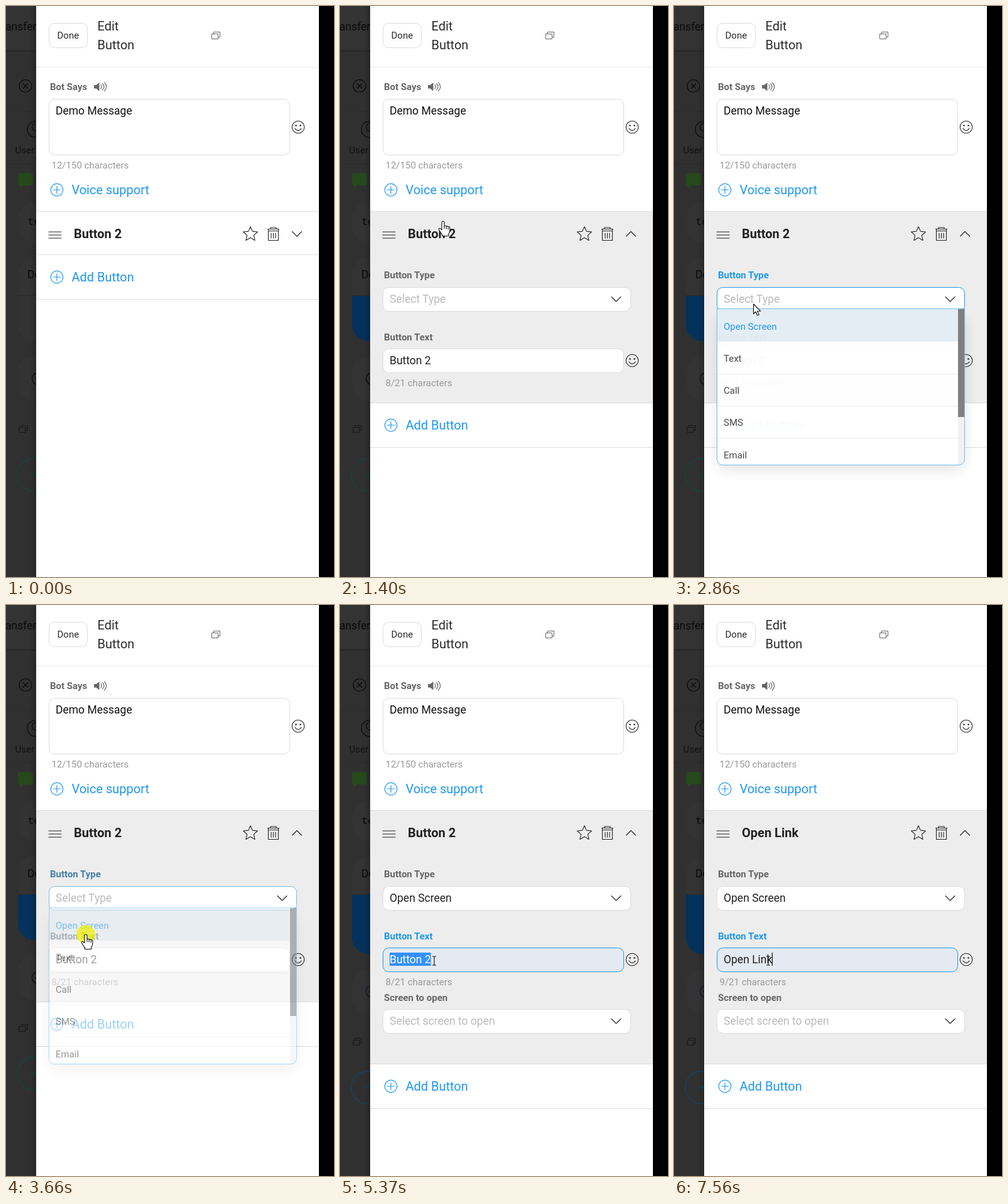
An HTML page for the animation above (8000 ms loop, 522 px wide and 910 px high).

```html
<!DOCTYPE html>
<html lang="en">
<head>
<meta charset="utf-8">
<title>Edit button panel</title>
<style>
  html, body { margin: 0; width: 100%; height: 100%; overflow: hidden; background: #000; }
  svg { display: block; width: 522px; height: 910px; font-family: Roboto, Arial, sans-serif; }
  text { white-space: pre; }
  .ink { fill: none; stroke: #262626; stroke-width: 1.1; stroke-linejoin: round; stroke-linecap: round; }
  .thin { fill: none; stroke: #555; stroke-width: .9; }
  .grey { fill: none; stroke: #666; stroke-width: 1.2; stroke-linecap: round; }
  .blue { fill: none; stroke: #1e98f0; stroke-width: 1.2; stroke-linecap: round; }
  .rule { stroke: #dcdcdc; }
  .dark { fill: none; stroke: #0b0b0b; stroke-width: 1.2; }
  .cursor { fill: #fff; stroke: #111; stroke-width: 1.1; stroke-linejoin: round; }
</style>
</head>
<body>
<svg id="stage" viewBox="0 0 522 910"></svg>
<script>
const LOOP = 8000, TICK = 1000 / 13;
const BLUE = '#1e98f0';

// ---------- markup helpers ----------
const text = (x, y, size, str, fill, extra = '') =>
  `<text x="${x}" y="${y}" font-size="${size}" fill="${fill}" ${extra}>${str}</text>`;
const label = (y, str, id = '') => text(70, y, 15, str, '#666', `font-weight="700" id="${id}"`);
const box = (x, y, w, h, extra = '') =>
  `<rect x="${x + .5}" y="${y + .5}" width="${w - 1}" height="${h - 1}" rx="9" fill="#fff" stroke="#dcdcdc" ${extra}/>`;
const path = (d, cls = 'ink', extra = '') => `<path d="${d}" class="${cls}" ${extra}/>`;
const ring = (x, y, r, cls, extra = '') => `<circle cx="${x}" cy="${y}" r="${r}" class="${cls}" ${extra}/>`;
const rule = y => path(`M48 ${y + .5}H498`, 'rule');
const chevron = (x, y, extra = '') => path(`M${x - 7.5} ${y - 3.5}l7.5 7.5l7.5 -7.5`, 'ink', extra);
const copyIcon = (x, y, cls) => path(`M${x} ${y + 3.5}h10v8h-10zM${x + 3} ${y + 3.5}v-3h10v8h-3`, cls);
const plus = (y, str, id = '') => ring(81, y, 9.8, 'blue') + path(`M75.5 ${y}h11M81 ${y - 5.5}v11`, 'blue') +
  text(104.4, y + 7, 20, str, BLUE, `id="${id}"`);
const smile = y => ring(465, y, 9.8, 'ink') + path(`M460 ${y + 2}q5 7 10 0`) +
  [-3.5, 3.5].map(dx => `<circle cx="${465 + dx}" cy="${y - 2.5}" r="1.3" fill="#262626"/>`).join('');

function star(cx, cy, r) {
  let d = '';
  for (let i = 0; i < 10; i++) {
    const a = -Math.PI / 2 + i * Math.PI / 5, k = i % 2 ? r * .47 : r;
    d += (i ? 'L' : 'M') + (cx + k * Math.cos(a)) + ' ' + (cy + k * Math.sin(a));
  }
  return path(d + 'Z');
}

// ---------- scene ----------
const card = (y, h, extra = '') => `<rect x="19" y="${y}" width="90" height="${h}" rx="26" fill="#333" ${extra}/>`;

const backdrop = `
  <rect width="48" height="910" fill="#303030"/>
  <rect width="48" height="70" fill="#333"/>
  <rect y="70" width="48" height="3" fill="#2a2a2a"/>
  <path d="M0 168.5H48M0 251.5H48" stroke="#2b2b2b"/>
  ${text(-1, 39, 17.5, 'ansfer', '#0b0b0b')}
  ${ring(31, 127.5, 10, 'dark')}${path('M27 123.5l8 8m0 -8l-8 8', 'dark')}
  ${ring(47, 196.5, 13, 'dark')}${ring(48, 193, 6.5, 'dark')}
  ${text(14.5, 235, 15, 'User', '#111')}
  <path d="M19 268q0 -1.5 2 -1.5h20q2 0 2 1.5v16q0 2 -2 2h-14l-5 5v-5h-1q-2 0 -2 -2z" fill="#26491b"/>
  ${card(313, 63)}
  ${text(34, 349, 17, 'te', '#0b0b0b', 'style="font-family:\'Noto Sans Mono\',monospace"')}
  ${card(401, 133, 'id="card"')}
  ${text(34, 434, 17.5, 'Demo', '#0b0b0b')}
  <path d="M19 461.5H48" stroke="#2a2a2a"/>
  <path id="cardFill" fill="#04325c"/>
  <g id="below">
    ${card(558, 71)}
    ${ring(51, 594, 9.5, 'dark', 'id="dot"')}${path('M46 594h5', 'dark')}
    <g opacity=".6">${copyIcon(21, 668, 'dark')}</g>
    <g id="adder" fill="none" stroke-width="1.4"><circle cx="44" cy="747" r="26"/><path d="M40 747h9M44.5 742.5v9"/></g>
  </g>
  <rect x="38" width="10" height="910" fill="url(#edge)"/>`;

const header = `
  ${box(68, 27, 62, 40)}${text(81.5, 52, 15, 'Done', '#2a2a2a')}
  ${text(145.5, 39, 20, 'Edit', '#2b2b2b')}${text(145.5, 69, 20, 'Button', '#2b2b2b')}
  ${copyIcon(327.5, 41, 'thin')}
  <path d="M48 97.5H498" stroke="#e8e8e8"/>
  ${label(134, 'Bot Says')}
  <path d="M140 126h3.5l5 -4v13.5l-5 -4h-3.5z" fill="#666"/>
  ${[0, 1, 2].map(i => path(`M${151 + 2.8 * i} ${125.5 - 1.8 * i}q${2.5 + 1.8 * i} ${3.2 + 1.8 * i} 0 ${6.4 + 3.6 * i}`, 'grey')).join('')}
  ${box(68, 148, 384, 90)}${text(79, 173, 17.5, 'Demo Message', '#111')}
  ${smile(193)}
  ${text(72.5, 259, 15, '12/150 characters', '#999')}
  ${plus(293, 'Voice support')}`;

const section = `
  <rect x="48" y="328" width="450" id="tint" fill="#ededed"/>
  ${rule(327)}
  <g id="head">
    ${path('M68 360h20m-20 5h20m-20 5h20', 'ink')}
    ${text(108, 370, 20, '', '#222', 'font-weight="700" id="title"')}
    ${star(389, 363.7, 12)}
    ${path('M416.5 355.5h18m-13.5 0v-2.5h9v2.5m-12.5 0v18h16v-18m-16 3h16m-11.5 3.5v8m3.5 -8v8m3.5 -8v8')}
    ${chevron(463, 363, 'id="arrow"')}
  </g>
  <g clip-path="url(#fold)"><g id="fields">
    ${label(434, 'Button Type', 'typeLabel')}
    ${box(68, 448, 395, 39, 'id="typeBox"')}${text(79, 473, 17.5, '', '#bbb', 'id="typeText"')}${chevron(439.5, 467)}
    ${label(533, 'Button Text', 'nameLabel')}
    ${box(68, 546, 384, 39, 'id="nameBox"')}
    <rect id="mark" x="79" y="554" height="21" fill="#3390ff"/>
    ${text(79, 571, 17.5, '', '#222', 'id="name"')}
    <rect id="caret" y="554" width="1.2" height="21" fill="#111"/>
    ${smile(565)}
    ${text(72.5, 606, 15, '', '#999', 'id="count"')}
    <g id="screen">
      ${label(631, 'Screen to open')}
      ${box(68, 644, 395, 39)}${text(79, 669, 17.5, 'Select screen to open', '#bbb')}${chevron(439.5, 663)}
    </g>
  </g></g>
  <g id="foot">${rule(396)}${plus(432, 'Add Button', 'add')}${rule(467)}</g>`;

const option = (str, i) => text(79, 515.7 + 51.25 * i, 15, str, i ? '#444' : BLUE) +
  (i ? `<path d="M69 ${Math.round(483 + 51.25 * i) + .5}H452" stroke="#eee"/>` : '');
const dropdown = `<g id="menu">
  <rect x="70" y="494" width="391" height="244" rx="9" opacity=".13" filter="url(#blur)"/>
  <g clip-path="url(#menuClip)">
    <rect x="68" y="482" width="395" height="250" fill="#fff"/>
    <rect x="68" y="482" width="395" height="53" fill="#e4edf5"/>
    ${['Open Screen', 'Text', 'Call', 'SMS', 'Email'].map(option).join('')}
    <rect x="452" y="482" width="11" height="250" fill="#f1f1f1"/>
    <rect x="452" y="482" width="11" height="173" fill="#7d7d7d"/>
  </g>
  <path d="M68.5 482.5V722.5a9 9 0 0 0 9 9H453.5a9 9 0 0 0 9 -9V482.5z" fill="none" stroke="#6dbcf5"/>
</g>`;

const pointer = `<g id="pointer">
  <circle id="spot" r="15" fill="#f3ee00" fill-opacity=".72"/>
  <path id="pArrow" class="cursor" d="M.5 .5V16l3.6 -3.3l2.5 5.8l2.6 -1.1l-2.5 -5.7h5z"/>
  <path id="pHand" class="cursor" d="M-2 13.5V2a2 2 0 0 1 4 0V8a1.8 1.8 0 0 1 3.2 .5a1.7 1.7 0 0 1 3 .7a1.5 1.5 0 0 1 2.6 1V15q0 3 -2 5V23.5H-1.5V21q-2 -2 -5 -7.5q-.5 -2.5 1.5 -2q1.5 .5 3 2zM2 8v4m3.2 -3v3.5m3 -2.5v3"/>
  <path id="pBeam" d="M-3 -7h2.2q.8 0 .8 1V6q0 1 -.8 1H-3M3 -7H.8Q0 -7 0 -6V6q0 1 .8 1H3" fill="none" stroke="#111" stroke-width="1.1"/>
</g>`;

document.getElementById('stage').innerHTML = `
  <defs>
    <linearGradient id="edge"><stop stop-color="#000" stop-opacity="0"/><stop offset="1" stop-color="#000" stop-opacity=".2"/></linearGradient>
    <filter id="blur" x="-20%" y="-20%" width="140%" height="140%"><feGaussianBlur stdDeviation="13"/></filter>
    <clipPath id="fold"><rect x="48" y="398" width="450" id="foldRect"/></clipPath>
    <clipPath id="menuClip"><path d="M68 482V722a9 9 0 0 0 9 9H454a9 9 0 0 0 9 -9V482z"/></clipPath>
  </defs>
  <rect width="522" height="910" fill="#000"/>
  ${backdrop}
  <rect x="48" width="450" height="910" fill="#fff"/>
  ${header}${section}${dropdown}${pointer}`;

// ---------- timing ----------
const EXPAND = 1000, PICK_TYPE = 2560, PICK_SCREEN = 3570, FOCUS = 4660;
const SELECT = 5300, CLEAR = 5500, TYPE = 6070, KEY_GAP = 183;
const NEW_NAME = 'Open Link';

const ramp = (t, a, b) => {
  const k = Math.min(1, Math.max(0, (t - a) / (b - a)));
  return k * k * (3 - 2 * k);
};
const within = (v, a, b) => v >= a && v < b;
const mix = (a, b, k) => `rgb(${a.map((v, i) => Math.round(v + (b[i] - v) * k))})`;

// Pointer trips: where to, and when.
const ENTRY = { x: 258, y: 602, at: 140 };
const trips = [
  { from: 140, to: 230, x: 243, y: 545 },
  { from: 380, to: 770, x: 164, y: 343 },
  { from: 1540, to: 2160, x: 140, y: 566 },
  { from: 2310, to: 2455, x: 126, y: 473 },
  { from: 2800, to: 3250, x: 127, y: 525 },
  { from: 4090, to: 4380, x: 150, y: 567 }
];
function pointerAt(t) {
  let { x, y } = ENTRY;
  for (const p of trips) {
    const k = ramp(t, p.from, p.to);
    x += (p.x - x) * k;
    y += (p.y - y) * k;
  }
  return { x, y };
}

function pointerShape(y, open, menu) {
  if (y < (open ? 397 : 467)) return 'pHand';
  if (menu > .3 && y > 487) return 'pHand';
  return open && within(y, 546, 585) ? 'pBeam' : 'pArrow';
}

function nameAt(t) {
  if (t < CLEAR) return 'Button 2';
  return NEW_NAME.slice(0, Math.max(0, Math.floor((t - TYPE) / KEY_GAP) + 1));
}

function caretOn(t) {
  if (t < FOCUS || within(t, SELECT, CLEAR)) return false;
  const keys = Math.min(NEW_NAME.length - 1, Math.floor((t - TYPE) / KEY_GAP));
  const since = t < CLEAR ? FOCUS : t < TYPE ? CLEAR : TYPE + keys * KEY_GAP;
  return (t - since) % 1000 < 500;
}

// ---------- drawing ----------
const $ = id => document.getElementById(id);
const set = (id, attrs) => { for (const k in attrs) $(id).setAttribute(k, attrs[k]); };
const show = (id, on) => set(id, { visibility: on ? 'visible' : 'hidden' });
const shift = (id, y) => set(id, { transform: `translate(0 ${y})` });
const WHITE = [255, 255, 255], GREY = [102, 102, 102], HOT = [30, 152, 240], EDGE = [220, 220, 220], FILL = [227, 234, 241];

function drawSection(t, open) {
  const name = nameAt(t), picked = t >= PICK_SCREEN + 120;
  const bottom = 396 + 236 * open + 99 * ramp(t, 3640, 3950) - 4 * ramp(t, CLEAR, 5700) + 4 * ramp(t, TYPE + 10, 6370);
  $('title').textContent = $('name').textContent = name;
  $('count').textContent = `${name.length}/21 characters`;
  $('typeText').textContent = picked ? 'Open Screen' : 'Select Type';
  set('typeText', { fill: picked ? '#222' : '#bbb' });
  show('screen', picked);

  set('tint', { height: bottom - 328, opacity: open });
  set('foldRect', { height: Math.max(0, bottom - 398) });
  set('fields', { opacity: open });
  set('arrow', { transform: `rotate(${-180 * open} 463 363.25)` });
  shift('foot', bottom - 396);
  shift('fields', name ? 0 : -4);
  shift('head', name ? 0 : -2);

  const typeHeat = ramp(t, PICK_TYPE, 2720) - ramp(t, PICK_SCREEN, 3660);
  const nameHeat = ramp(t, 1850, 2100) - ramp(t, 2330, 2510) + ramp(t, 4600, 4800);
  set('typeLabel', { fill: mix(GREY, HOT, typeHeat) });
  set('typeBox', { stroke: mix(EDGE, HOT, typeHeat) });
  set('nameLabel', { fill: mix(GREY, HOT, nameHeat) });
  set('nameBox', { stroke: mix(EDGE, HOT, nameHeat), fill: mix(WHITE, FILL, nameHeat) });

  const width = name ? $('name').getComputedTextLength() : 0, marked = within(t, SELECT, CLEAR);
  set('mark', { width });
  show('mark', marked);
  set('name', { fill: marked ? '#fff' : '#222' });
  set('caret', { x: 78.4 + width });
  show('caret', caretOn(t));
}

function drawBackdrop(t, open) {
  const grow = 22 * (ramp(t, 3640, 3900) - ramp(t, CLEAR, 5680) + (t >= TYPE ? 1 : 0));
  const late = t >= PICK_SCREEN + 120;
  set('card', { height: 133 + grow });
  set('cardFill', { d: `M19 462H48V${534 + grow}H45a26 26 0 0 1 -26 -26z`, opacity: open });
  shift('below', grow);
  set('dot', { style: `stroke:${late ? '#1c1238' : '#0b0b0b'}` });
  set('adder', { stroke: late ? '#0f4468' : '#12463f' });
}

function drawPointer(t, open, menu) {
  const { x, y } = pointerAt(t), shape = pointerShape(y, open, menu);
  set('pointer', { transform: `translate(${x.toFixed(1)} ${y.toFixed(1)})` });
  for (const id of ['pArrow', 'pHand', 'pBeam']) show(id, id === shape && t >= ENTRY.at);
  show('spot', [EXPAND, PICK_TYPE, PICK_SCREEN, FOCUS].some(at => within(t, at, at + 200)));
  set('add', { fill: !open && within(y, 397, 467) ? '#0f78c4' : BLUE });
}

function draw(time) {
  const t = Math.floor(time / TICK) * TICK;
  const open = ramp(t, EXPAND + 90, 1384);
  const menu = ramp(t, 2640, 2870) - ramp(t, PICK_SCREEN - 10, 3680);
  drawSection(t, open);
  drawBackdrop(t, open);
  set('menu', { opacity: menu });
  drawPointer(t, open, menu);
}

const start = performance.now();
function loop() {
  draw((performance.now() - start) % LOOP);
  requestAnimationFrame(loop);
}
loop();
</script>
</body>
</html>
```
